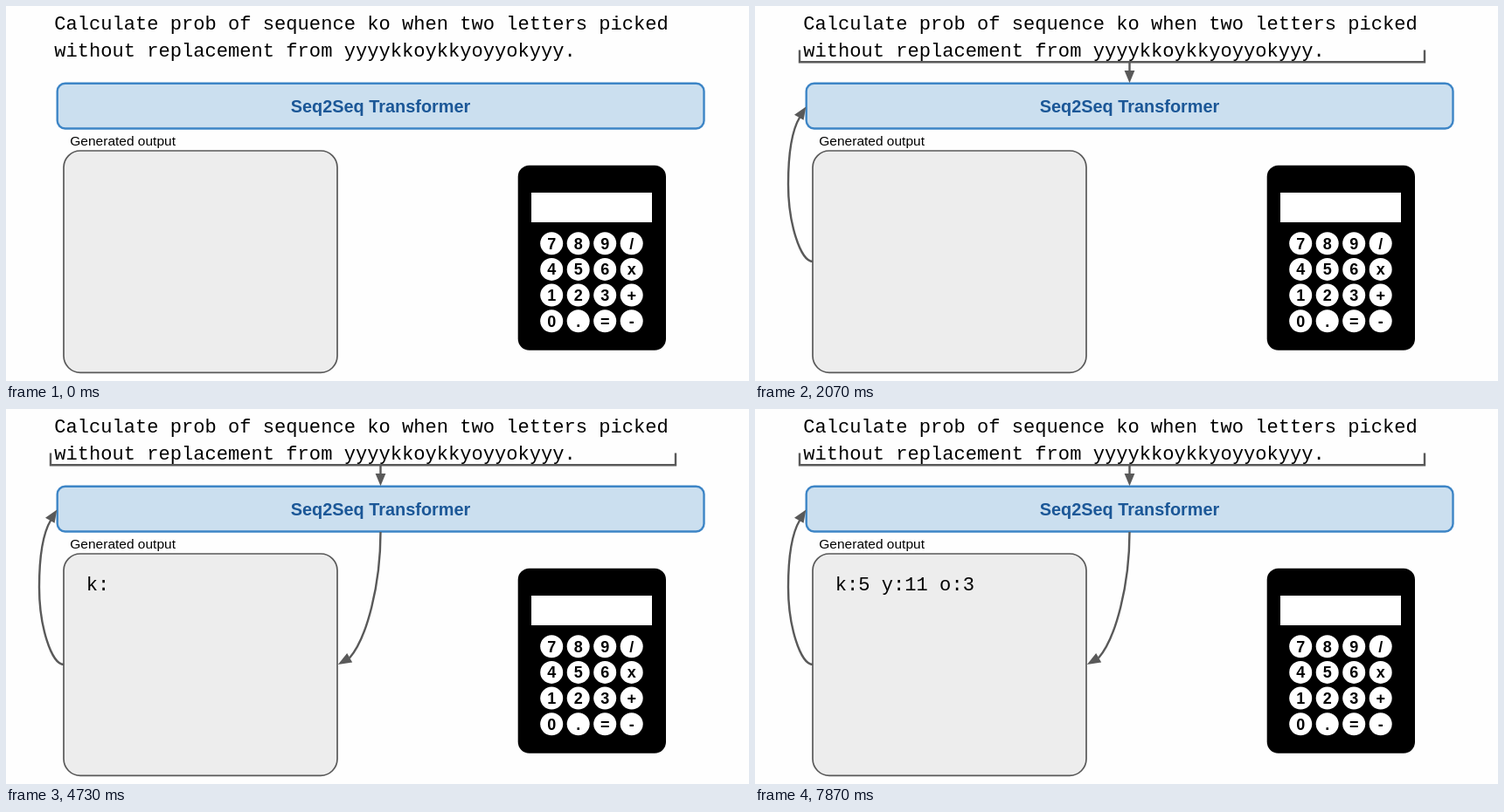
Animation of 850x430 px, one loop 8000 ms. Source, as an HTML page:

```html
<!DOCTYPE html>
<html lang="en">
<head>
<meta charset="utf-8">
<title>Seq2Seq calculator</title>
<style>
  html, body { margin: 0; width: 100%; height: 100%; overflow: hidden; background: #fefefe; }
  svg { display: block; width: 100vw; height: 100vh; }
  text { white-space: pre; }
  .mono { font: 22.1px "Liberation Mono", monospace; }
  .sans { font: 15.5px "Liberation Sans", sans-serif; }
  .title { font: bold 19.9px "Liberation Sans", sans-serif; fill: #1b5797; text-anchor: middle; }
  .key { font: bold 18px "Liberation Sans", sans-serif; text-anchor: middle; }
  .line { fill: none; stroke: #595959; stroke-width: 2.4; }
  .head { fill: #595959; }
</style>
</head>
<body>
<svg viewBox="0 0 850 430">
  <rect width="850" height="430" fill="#fefefe"/>
  <text class="mono" x="55.2" y="27.2">Calculate prob of sequence ko when two letters picked</text>
  <text class="mono" x="55.2" y="58">without replacement from yyyykkoykkyoyyokyyy.</text>

  <rect x="58.7" y="88.7" width="739.8" height="51.8" rx="9" fill="#cbdfef" stroke="#3d85c6" stroke-width="2.4"/>
  <text class="title" x="428.5" y="121.8">Seq2Seq Transformer</text>

  <text class="sans" x="73.3" y="160">Generated output</text>
  <rect x="66" y="166" width="313" height="254.3" rx="19" fill="#ededed" stroke="#595959" stroke-width="1.7"/>
  <text class="mono" id="out" x="91.8" y="207.5"></text>

  <g id="inputs">
    <path class="line" d="M51 50.5V64.2H766V50.5M428.5 64V76"/>
    <path class="head" d="M428.5 88.3L422.6 74H434.4Z"/>
    <path class="line" d="M66 293C52 293 38 249 38 204.5C38 165 43 141 51.5 127"/>
    <path class="head" d="M58.3 115.5L45 124.8L55.6 130.8Z"/>
  </g>
  <g id="result">
    <path class="line" d="M428.5 141C428.5 201.8 412.8 262.6 393 285.5"/>
    <path class="head" d="M379.8 293L390.2 280L396.2 290.6Z"/>
  </g>

  <rect x="585.7" y="182.8" width="169.3" height="212" rx="13"/>
  <rect x="601" y="214" width="138" height="34" fill="#fff"/>
  <g id="keys"></g>
</svg>
<script>
const LOOP = 8000;
const INPUTS_AT = 1800, RESULT_AT = 2900;
const TYPE_AT = 4030, TYPE_STEP = 400;
const TOKENS = ["k", ":", "5", " y", ":", "11", " o", ":", "3"];

const byId = id => document.getElementById(id);
const out = byId("out"), inputs = byId("inputs"), result = byId("result");

byId("keys").innerHTML = [..."789/456x123+0.=-"].map((label, i) => {
  const x = 624.2 + (i % 4) * 30.5;
  const y = 272.2 + Math.floor(i / 4) * 29.7;
  return `<circle cx="${x}" cy="${y}" r="13" fill="#fff"/>` +
    `<text class="key" x="${x}" y="${y + 6.3}">${label}</text>`;
}).join("");

const show = (el, on) => el.setAttribute("visibility", on ? "visible" : "hidden");

function draw(t) {
  show(inputs, t >= INPUTS_AT);
  show(result, t >= RESULT_AT);
  const count = Math.max(0, Math.floor((t - TYPE_AT) / TYPE_STEP) + 1);
  out.textContent = TOKENS.slice(0, count).join("");
}

let start;
function tick(now) {
  start ??= now;
  draw((now - start) % LOOP);
  requestAnimationFrame(tick);
}
draw(0);
requestAnimationFrame(tick);
</script>
</body>
</html>
```
